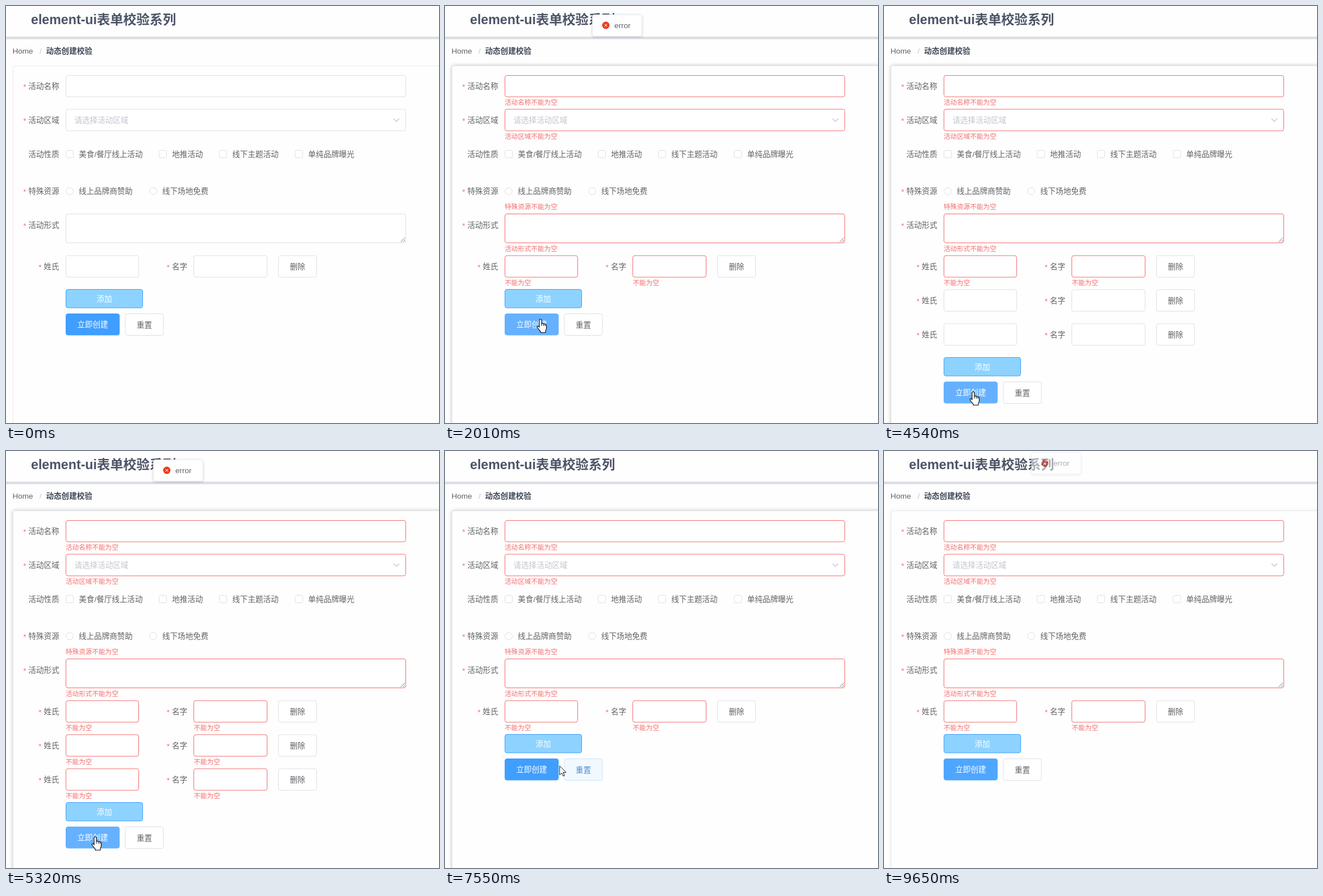
Recreate the animation shown at these times as an HTML page. Size 762x735 px, loop 9720 ms.

```html
<!DOCTYPE html>
<html lang="zh-CN">
<head>
<meta charset="utf-8">
<title>表单校验</title>
<style>
html, body { margin: 0; width: 100%; height: 100%; overflow: hidden; background: #fefefe; }
svg { display: block; font-family: "Liberation Sans", "Noto Sans CJK SC", "Noto Sans CJK", sans-serif; cursor: default; }
text { white-space: pre; }
</style>
</head>
<body>
<svg id="stage" width="762" height="735" viewBox="0 0 762 735"></svg>
<script>
const LOOP = 9720, ROW = 60;
const GREY = '#dcdfe6', INK = '#606266', RED = '#f56c6c', BLUE = '#409eff', LIGHT = '#66b1ff';
const stage = document.getElementById('stage');

// Pointer path: time, x, y
const path = [
  [70, 609, 710], [200, 500, 650], [380, 270, 550], [530, 176, 514], [1220, 176, 514], [1390, 168, 552],
  [2150, 168, 552], [2310, 173, 515], [2640, 173, 515], [2770, 174, 579], [3600, 174, 580], [4000, 165, 660],
  [4250, 160, 687], [4520, 157, 680], [5320, 157, 680], [5450, 160, 682], [5750, 470, 660], [6000, 660, 630],
  [6150, 655, 615], [6240, 636, 605], [6400, 519, 572], [6600, 519, 572], [6780, 519, 516], [7000, 519, 516],
  [7240, 483, 533], [7480, 222, 554], [7550, 202, 555], [7700, 160, 553], [8870, 160, 553], [9020, 589, 714],
  [9090, 640, 760]
];
const clicks = [1540, 2540, 3000, 4580, 6420, 6860, 8010];
const messages = [1600, 4640, 8045];
const focusSpans = [[1540, 2540], [4580, 6440], [8010, 9590]];

const clamp = v => Math.max(0, Math.min(1, v));
const inside = (t, a, b) => t >= a && t < b;

function bezier(x1, y1, x2, y2) {
  const at = (a, b, s) => 3 * a * s * (1 - s) ** 2 + 3 * b * s * s * (1 - s) + s ** 3;
  return p => {
    let lo = 0, hi = 1;
    for (let i = 0; i < 20; i++) {
      const mid = (lo + hi) / 2;
      if (at(x1, x2, mid) < p) lo = mid; else hi = mid;
    }
    return at(y1, y2, lo);
  };
}
const ease = bezier(.25, .1, .25, 1), zoom = bezier(.23, 1, .32, 1);
const ramp = (t, start, length, curve = ease) => curve(clamp((t - start) / length));

function mix(a, b, k) {
  const part = (c, i) => parseInt(c.slice(i, i + 2), 16);
  return `rgb(${[1, 3, 5].map(i => Math.round(part(a, i) + (part(b, i) - part(a, i)) * k))})`;
}

const rowCount = t => t < 2600 ? 1 : t < 3070 ? 2 : t < 6540 ? 3 : t < 6930 ? 2 : 1;

function pointer(t) {
  const i = path.findIndex(k => k[0] > t);
  if (i < 1) return null;
  const [a, b] = [path[i - 1], path[i]], k = (t - a[0]) / (b[0] - a[0]);
  return [a[1] + (b[1] - a[1]) * k, a[2] + (b[2] - a[2]) * k];
}

// Name of the control under the pointer
function target(t) {
  const p = pointer(t);
  if (!p) return '';
  const [x, y] = p, n = rowCount(t), dy = (n - 1) * ROW;
  const within = (x0, y0, x1, y1) => x >= x0 && x <= x1 && y >= y0 && y <= y1;
  if (within(105, 499 + dy, 240, 532 + dy)) return 'add';
  if (within(105, 542 + dy, 200, 580 + dy)) return 'submit';
  if (within(210, 542 + dy, 277, 580 + dy)) return 'reset';
  for (let i = 0; i < n; i++) {
    const top = 440 + i * ROW;
    if (within(479, top, 547, top + 38)) return 'delete' + i;
    if (within(105, top, 234, top + 38) || within(330, top, 460, top + 38)) return 'input';
  }
  return '';
}

// Share of the last 100 ms in which a condition held: a linear .1s transition
function level(t, test) {
  let sum = 0;
  for (let i = 0; i < 10; i++) sum += test(t - i * 10 - 5) ? .1 : 0;
  return sum;
}
const hover = (t, name) => level(t, u => target(u) === name);

const text = (x, y, s, fill = INK, size = 13.55, more = '') =>
  `<text x="${x}" y="${y + size * .38}" font-size="${size}" fill="${fill}" ${more}>${s}</text>`;
const box = (x, y, w, h, stroke = GREY, fill = '#fff', r = 3.5) =>
  `<rect x="${x}" y="${y}" width="${w}" height="${h}" rx="${r}" fill="${fill}" stroke="${stroke}"/>`;
const line = (d, stroke, width = 1, fill = 'none') =>
  `<path d="${d}" fill="${fill}" stroke="${stroke}" stroke-width="${width}" stroke-linejoin="round"/>`;
const label = (x, y, s, required = true) =>
  (required ? text(x - 9.3, y + 1, '*', RED) : '') + text(x, y, s);

function button(x, y, w, h, s, fill, stroke, color) {
  return box(x, y, w, h, stroke, fill) + text(x + w / 2, y + h / 2, s, color, 13.55, 'text-anchor="middle"');
}
function plainButton(t, x, y, s, name) {
  const k = hover(t, name);
  return button(x, y, 67, 38, s, mix('#ffffff', '#ecf5ff', k), mix(GREY, '#c6e2ff', k), mix(INK, BLUE, k));
}

const border = (t, start) => mix(GREY, RED, ramp(t, start, 200));
function error(t, start, x, y, s) {
  const k = ramp(t, start, 300, zoom);
  if (!k) return '';
  return `<g opacity="${k}" transform="translate(0 ${y - 6}) scale(1 ${k})">${text(x, 6, s + '不能为空', RED, 11.6)}</g>`;
}

function header(t) {
  const shade = ramp(t, 80, 300) * (1 - .7 * ramp(t, 9150, 300));
  return `<rect y="54" width="762" height="4" fill="#dcdde4"/><rect y="58" width="762" height="1" fill="#f0f0f4"/>` +
    text(44, 23, 'element-ui表单校验系列', '#4c5467', 23.2, 'font-weight="700"') +
    text(11.5, 79, 'Home') + text(59, 79, '/', '#c0c4cc') +
    text(70.5, 79, '动态创建校验', '#3f4758', 13.55, 'font-weight="700"') +
    `<g style="filter:drop-shadow(0 0 3px rgba(0,0,0,${.25 * shade}))">${box(12.5, 105.5, 800, 700, '#e6e9f0', '#fefefe')}</g>`;
}

function fields(t) {
  const e = messages[0], edge = border(t, e);
  const checks = [[105.5, '美食/餐厅线上活动'], [269.5, '地推活动'], [375.5, '线下主题活动'], [509, '单纯品牌曝光']];
  const radios = [[112, '线上品牌商赞助'], [259, '线下场地免费']];
  return label(39.5, 141, '活动名称') + box(105.5, 122.5, 598, 37.5, edge) + error(t, e, 105, 170, '活动名称') +
    label(39.5, 201, '活动区域') + box(105.5, 182, 598, 38, edge) + error(t, e, 105, 230, '活动区域') +
    text(120.5, 201, '请选择活动区域', '#c0c4cc') + line('M682 198.5l5 5 5-5', '#c0c4cc', 1.1) +
    label(39.5, 261, '活动性质', false) +
    checks.map(([x, s]) => box(x, 254.5, 13, 13, GREY, '#fff', 2) + text(x + 22.8, 261, s)).join('') +
    label(39.5, 326, '特殊资源') + error(t, e, 105, 354, '特殊资源') +
    radios.map(([x, s]) => `<circle cx="${x}" cy="326.5" r="6.3" fill="#fff" stroke="${GREY}"/>` + text(x + 16, 326, s)).join('') +
    label(39.5, 386, '活动形式') + box(105.5, 366.5, 598, 51, edge) + error(t, e, 105, 428, '活动形式') +
    line('M694.5 416l7.5-7.5M699 416l3-3', '#777');
}

function person(t, i) {
  const y = 440 + i * ROW, e = messages[i ? 1 : 0], edge = border(t, e);
  return label(66.5, y + 19, '姓氏') + box(105.5, y, 128, 38, edge) + error(t, e, 105, y + 48, '') +
    label(292, y + 19, '名字') + box(330.5, y, 129, 38, edge) + error(t, e, 330.5, y + 48, '') +
    plainButton(t, 479.5, y, '删除', 'delete' + i);
}

function actions(t) {
  const dy = (rowCount(t) - 1) * ROW;
  const lit = level(t, u => target(u) === 'submit' || focusSpans.some(([a, b]) => inside(u, a, b)));
  const pressed = target(t) === 'submit' && clicks.some(c => inside(t, c, c + 90));
  const fill = pressed ? '#3a8ee6' : mix(BLUE, LIGHT, lit);
  return button(105.5, 499.5 + dy, 135, 32.5, '添加', '#8ed3ff', mix(BLUE, LIGHT, hover(t, 'add')), '#fff') +
    button(105.5, 542.5 + dy, 94, 37.5, '立即创建', fill, fill, '#fff') +
    plainButton(t, 210, 542.5 + dy, '重置', 'reset');
}

function toast(t) {
  const start = messages.find(m => inside(t, m, m + 1920));
  if (start === undefined) return '';
  const end = start + 1520, leaving = t >= end;
  const show = length => leaving ? 1 - ramp(t, end, length) : ramp(t, start, length);
  return `<g opacity="${show(300)}" transform="translate(0 ${-38 * (1 - show(400))})">
    <g style="filter:drop-shadow(0 1px 2px rgba(0,0,0,.18))">${box(259.5, 15.5, 87, 37.5, '#ebeef5')}</g>
    <circle cx="283" cy="34" r="6.5" fill="#ee3a1c"/>${line('M280.5 31.5l5 5m0-5l-5 5', '#fff')}
    ${text(298, 33.5, 'error')}</g>`;
}

function cursor(t) {
  const p = pointer(t);
  if (!p) return '';
  const over = target(t);
  const ring = clicks.some(c => inside(t, c, c + 110)) ? '<circle r="12" cy="1" fill="#f5f01e" opacity=".75"/>' : '';
  const shape = over === 'input'
    ? line('M-3.5-7Q0-7 0-5.5V5.5Q0 7-3.5 7M3.5-7Q0-7 0-5.5M0 5.5Q0 7 3.5 7', '#111', 1.4)
    : over
      ? line('M-2 2Q-2 0 0 0T2 2V8Q4 6.6 5.4 8.4Q7 7.4 8.2 9.2Q10.6 8.6 10.6 11.5V15Q10.6 18 9 20V23.5H0V21.5Q-3 18-5.6 14.5Q-6 11.5-3.4 12.4L-2 14Z', '#111', 1.2, '#fff') +
        line('M2 8V12M5.4 8.4V12M8.2 9.2V12.5', '#111')
      : line('M0 0V16L3.8 12.5L6.2 18L8.6 17L6.2 11.6H11.3Z', '#111', 1, '#fff');
  return `<g transform="translate(${p})">${ring}${shape}</g>`;
}

function draw(now) {
  const t = now % LOOP;
  let people = '';
  for (let i = 0; i < rowCount(t); i++) people += person(t, i);
  stage.innerHTML = header(t) + fields(t) + people + actions(t) + toast(t) + cursor(t);
}

const begin = performance.now();
function tick() {
  draw(performance.now() - begin);
  requestAnimationFrame(tick);
}
tick();
</script>
</body>
</html>
```
